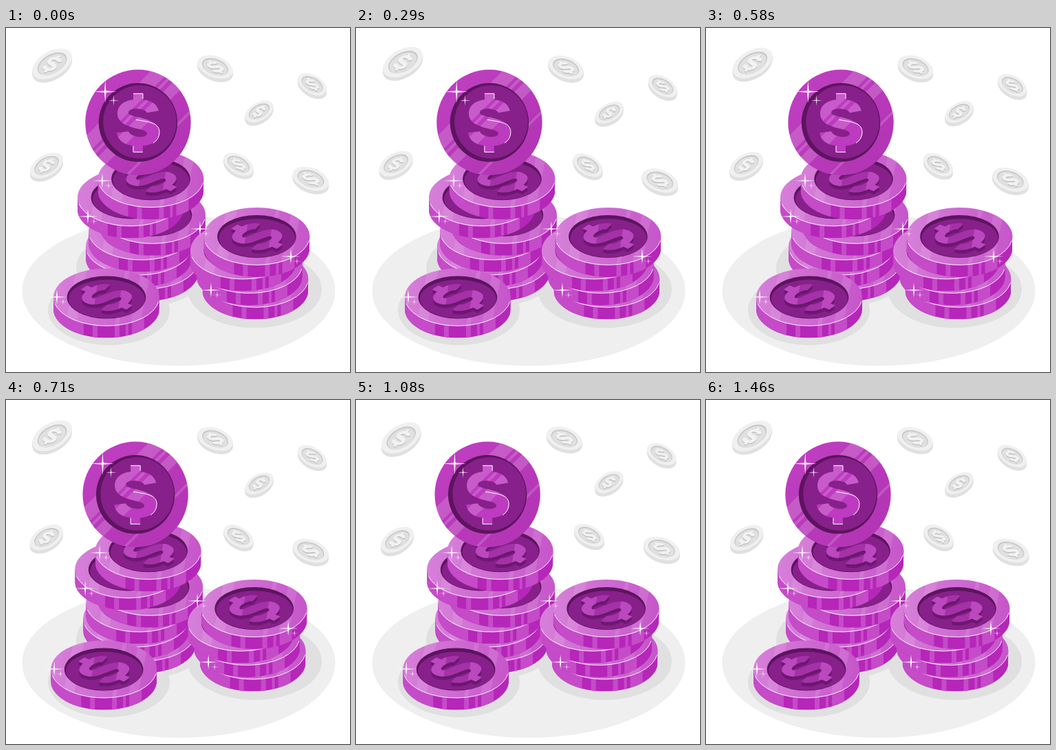
Write an HTML page that moves like this. It is 500 px wide and 500 px high and loops after 1.5 s.

```html
<!DOCTYPE html>
<html lang="en">
<head>
<meta charset="utf-8">
<title>Coins</title>
<style>
  html, body { margin: 0; height: 100%; overflow: hidden; background: #fff; }
  svg { display: block; width: 100%; height: 100%; }
</style>
</head>
<body>
<svg viewBox="0 0 500 500">
  <defs>
    <linearGradient id="face"><stop stop-color="#d680d9"/><stop offset="1" stop-color="#c656ca"/></linearGradient>
    <linearGradient id="disc" x2="1" y2="1"><stop stop-color="#c140c3"/><stop offset="1" stop-color="#b033b2"/></linearGradient>

    <path id="dollar" d="M30-17 13-14C11-21-14-23-14-14C-14-6 31-9 31 14C31 28 18 33 7 34V43H-7V34C-20 32-29 27-31 15L-14 13C-11 22 13 24 13 16C13 7-30 11-30-13C-30-26-18-32-7-33V-42H7V-33C18-32 27-28 30-17Z"/>
    <use id="flatDollar" href="#dollar" transform="scale(1 .545) rotate(-51)"/>

    <clipPath id="sideClip"><path d="M-77 0V17A77 42 0 0 0 77 17V0Z"/></clipPath>
    <clipPath id="faceClip"><ellipse rx="77" ry="42"/></clipPath>
    <clipPath id="discClip"><circle r="76.7"/></clipPath>
    <clipPath id="dollarClip"><use href="#dollar"/></clipPath>
    <clipPath id="flatClip"><use href="#dollar" transform="scale(1 .545) rotate(-51)"/></clipPath>

    <g id="coin">
      <g clip-path="url(#sideClip)">
        <path fill="#b626b9" d="M-77 0H77V60H-77Z"/>
        <path fill="#c54bc8" data-bands="-77 44 -20 7 12 7 28 4 37 18" data-slant="0"/>
      </g>
      <ellipse rx="77" ry="42" fill="url(#face)"/>
      <path clip-path="url(#faceClip)" fill="#fff" opacity=".1" data-bands="-52 16 20 6 43 14" data-slant=".2"/>
      <path d="M-75 9A77 42 0 0 0 76 6" fill="none" stroke="#fff" stroke-width=".9" opacity=".9"/>
      <ellipse rx="57.3" ry="31" fill="#5d145f"/>
      <ellipse cx=".5" cy="2.3" rx="55.5" ry="28" fill="#87208a"/>
    </g>

    <g id="topCoin">
      <use href="#coin"/>
      <g fill="#6c1870"><use href="#flatDollar" y="5"/><use href="#flatDollar" y="3"/><use href="#flatDollar" y="1"/></g>
      <use href="#flatDollar" fill="#a531a8"/>
      <path clip-path="url(#flatClip)" fill="#bb48be" data-bands="-40 24 20 20" data-slant=".15"/>
    </g>

    <g id="bigCoin">
      <circle r="76.7" fill="url(#disc)"/>
      <g clip-path="url(#discClip)">
        <path id="shine" fill="#fff" opacity=".16" data-bands="-56 28 -22 6 -8 22 58 5" data-slant="1"/>
      </g>
      <circle r="57.2" fill="#5d145f"/>
      <circle cx="2.6" cy="-.8" r="53.3" fill="#87208a"/>
      <use href="#dollar" fill="#bd3bc0"/>
      <g clip-path="url(#dollarClip)"><use href="#shine"/></g>
      <path d="M-7-42H7V-34M-7 34V43H7M-3-4C14-1 31 0 31 14Q31 24 22 30" fill="none" stroke="#fff"/>
    </g>

    <path id="spark" fill="#fff" d="M0-1 .07-.07 1 0 .07 .07 0 1-.07 .07-1 0-.07-.07Z"/>
  </defs>

  <ellipse cx="251" cy="382" rx="227.5" ry="109" fill="#efefef"/>
  <g fill="#e0e0e0">
    <ellipse cx="199" cy="349" rx="97" ry="56"/>
    <ellipse cx="361.5" cy="380" rx="97.500" ry="56"/>
    <ellipse cx="149.5" cy="410" rx="88.500" ry="51"/>
  </g>
  <g id="sway"></g>
  <g id="shake"></g>
</svg>
<script>
const byId = id => document.getElementById(id);
const sway = byId('sway'), shake = byId('shake');

// Parallel stripes given as "x width x width ..." along the horizontal axis
for (const path of document.querySelectorAll('[data-bands]')) {
  const lean = path.dataset.slant * 100;
  path.setAttribute('d', path.dataset.bands.replace(/(\S+) (\S+)/g, (_, x, w) =>
    `M${+x + lean}-100h${w}L${+x + +w - lean} 100h${-w}Z`));
}

const use = (id, x, y) => `<use href="#${id}" x="${x}" y="${y}"/>`;

// Coins from the bottom up; the gap between them may widen with height
const stack = (xs, bottom, step = 0, growth = 0) => xs.map((x, i) =>
  use(i < xs.length - 1 ? 'coin' : 'topCoin', x, bottom - step * i - growth * i * i)).join('');

const spark = (x, y, rx, ry = rx) =>
  `<use href="#spark" transform="translate(${x} ${y}) scale(${rx} ${ry})"/>`;
const sparkPair = ([x, y]) => spark(x, y, 15, 11) + spark(x + 9, y + 7, 6.5, 5);

function greyCoin(x, y, r, tilt) {
  const place = (dy, scale) => `transform="translate(${x} ${y + dy}) rotate(${tilt}) scale(${scale} ${scale * .58})`;
  const disc = (k, dy, fill) => `<circle r="1" fill="${fill}" ${place(dy, r * k)}"/>`;
  const glyph = (dy, fill) =>
    `<use href="#dollar" fill="${fill}" ${place(dy, r / 77)} rotate(${tilt < 0 ? 59 : -53})"/>`;
  let edge = '';
  for (let dy = 5; dy > 0; dy--) edge += disc(1, dy, '#e0e0e0');
  return edge + disc(1, 0, '#f0f0f0') + disc(.74, 0, '#c7c7c7') + disc(.69, .9, '#e0e0e0') +
    glyph(1.5, '#c2c2c2') + glyph(0, '#f2f2f2');
}

sway.innerHTML =
  greyCoin(67, 52.2, 31.6, -30) + greyCoin(368, 121.2, 22.5, -30) + greyCoin(59, 200, 26.4, -30) +
  greyCoin(445, 81.7, 23, 30) + greyCoin(338, 198, 23.7, 30) +
  greyCoin(304, 56.5, 26.8, 20) + greyCoin(443, 219, 27.3, 20);

shake.innerHTML =
  stack([203, 193, 197, 213, 181, 210.5], 338, 19.5, .85) +
  use('bigCoin', 192, 137.3) +
  stack([362.5, 354, 345, 364.5], 364.5, 20.5) +
  stack([146], 391.5) +
  spark(144.3, 92.5, 16.5) + spark(156.5, 105.3, 8) +
  [[140, 222], [119, 274], [74, 391], [282, 292], [414, 332], [298, 381]].map(sparkPair).join('');

const LOOP = 1500, STEPS = 36;

// The shake runs the same way forwards and backwards around its middle
const shakeKey = i => [0, -1, 2, -4, 4, -4][Math.min(i, 10 - i)];

// cubic-bezier(.36, .07, .19, .97)
function ease(x) {
  const curve = (a, b, s) => 3 * (1 - s) ** 2 * s * a + 3 * (1 - s) * s * s * b + s ** 3;
  let lo = 0, hi = 1;
  for (let i = 0; i < 20; i++) {
    const mid = (lo + hi) / 2;
    if (curve(.36, .19, mid) < x) lo = mid; else hi = mid;
  }
  return curve(.07, .97, lo);
}

// Linear swing 0 → 1 → -1 → 0
const swing = p => p < .25 ? 4 * p : p < .75 ? 2 - 4 * p : 4 * p - 4;

function draw(now) {
  const step = Math.floor((now % LOOP + 5) * STEPS / LOOP) % STEPS;
  const p = (step + .4) / STEPS;
  const i = Math.floor(p * 10);
  const from = shakeKey(i);
  const dx = from + (shakeKey(i + 1) - from) * ease(p * 10 - i);
  shake.setAttribute('transform', `translate(${dx} 0)`);
  sway.setAttribute('transform', `rotate(${swing(p)} 252 135)`);
}

const start = performance.now();
function tick() {
  draw(performance.now() - start);
  requestAnimationFrame(tick);
}
tick();
</script>
</body>
</html>
```
